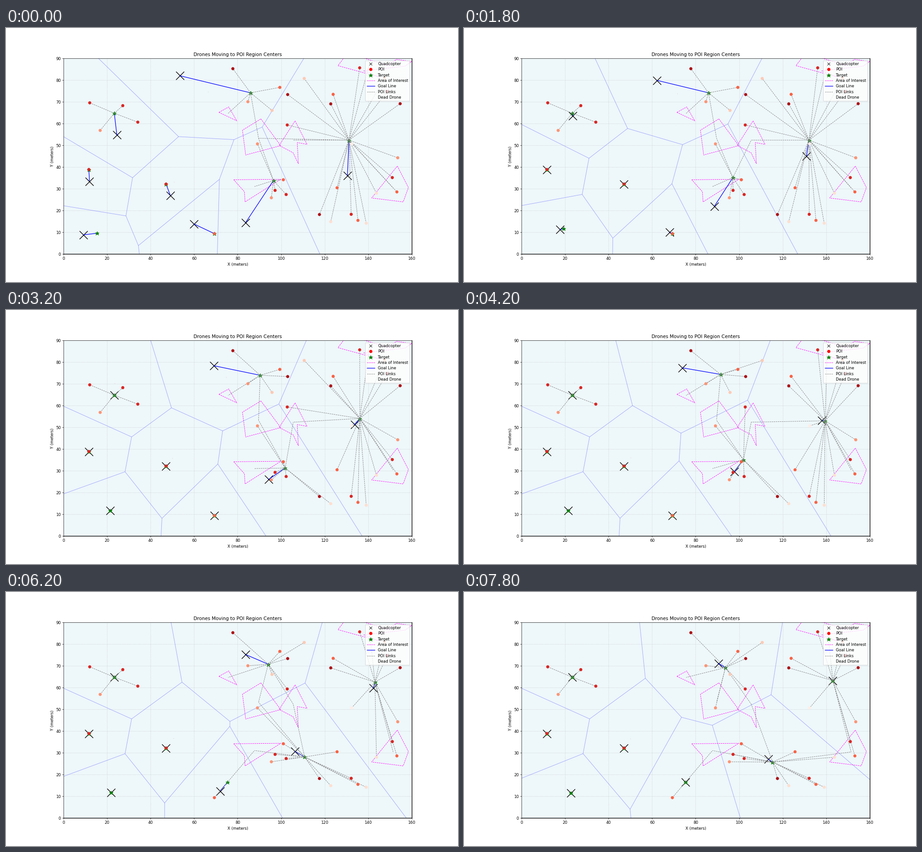
Recreate the animation shown at these times as a matplotlib script. Size 998 by 561 pixels, loop 8000 ms.

```python
import numpy as np
import matplotlib.pyplot as plt
from matplotlib.animation import FuncAnimation
from matplotlib.collections import LineCollection
from matplotlib.lines import Line2D
from matplotlib.patches import Polygon

DPI = 62.375
W, H = 160, 90
FRAMES, INTERVAL = 40, 200
SPEED = 1.0
AREA_WEIGHT = 0.25

# Points of interest by weight; the weight sets both colour and pull.
POIS = {
    .85: [(77.8, 85.3), (103.0, 73.4), (122.8, 69.1), (154.7, 69.2), (117.6, 18.2),
          (148.8, 74.8)],
    .70: [(12.0, 69.6), (27.2, 68.3), (34.1, 60.7), (102.8, 59.4), (136.1, 85.7),
          (151.1, 35.2), (132.2, 18.3), (97.2, 29.3), (102.3, 27.4), (11.6, 38.9),
          (47.1, 32.2)],
    .52: [(99.4, 76.7), (123.9, 73.5), (153.2, 28.6), (125.7, 30.5), (135.3, 15.5),
          (101.0, 34.2), (69.3, 9.4)],
    .37: [(16.8, 56.9), (84.7, 70.1), (89.1, 50.7), (153.6, 44.3), (95.5, 25.9),
          (147.5, 81.0)],
    .20: [(95.8, 66.1), (110.6, 80.8)],
    .13: [(122.8, 14.9), (139.1, 14.2), (143.8, 28.0)],
    .04: [(132.4, 50.7)],
}

AREAS = [
    [(90.7, 62.2), (99.8, 49.9), (83.7, 45.6), (82.2, 57.0)],
    [(106.4, 61.3), (111.9, 50.5), (107.4, 51.3), (107.9, 41.6), (105.5, 46.6),
     (99.1, 50.0)],
    [(78.2, 34.2), (99.8, 34.4), (83.4, 24.0), (83.1, 28.7)],
    [(71.4, 65.2), (75.9, 67.7), (79.6, 61.3)],
    [(153.4, 40.5), (158.5, 30.6), (156.1, 24.0), (141.6, 25.8)],
    [(126.1, 86.7), (145, 81.5), (138, 84.3), (157, 86.5), (160, 88.6), (153, 89.6),
     (149, 86.8), (138, 90.2), (128.8, 90.2)],
]

START = np.array([(52.47, 82.29), (24.59, 53.76), (11.93, 32.5), (8.07, 8.7),
                  (49.41, 26.0), (59.0, 14.28), (83.09, 13.62), (130.42, 35.1)])

POINTS = np.array([p for group in POIS.values() for p in group])
WEIGHTS = np.array([w for w, group in POIS.items() for _ in group])
GRID = np.stack(np.meshgrid(np.arange(.25, W, .5), np.arange(.25, H, .5)), -1).reshape(-1, 2)


def outline(corners):
    c = np.array(corners)
    t = np.linspace(0, 1, 60)[:, None]
    return np.vstack([a + t * (b - a) for a, b in zip(c, np.roll(c, -1, 0))])


def centroid(corners):
    a = np.array(corners)
    b = np.roll(a, -1, 0)
    cross = a[:, 0] * b[:, 1] - b[:, 0] * a[:, 1]
    return cross @ (a + b) / (3 * cross.sum())


OUTLINES = [outline(a) for a in AREAS]
CENTERS = [centroid(a) for a in AREAS]


def nearest(points, sites):
    return ((points[:, None] - sites) ** 2).sum(2).argmin(1)


def cell_centroids(sites):
    owner = nearest(GRID, sites)
    return np.array([GRID[owner == i].mean(0) for i in range(len(sites))])


def voronoi_edges(sites):
    """Clip each pair's bisector to the part that no third site is closer to."""
    edges = []
    for i, p in enumerate(sites):
        for j in range(i + 1, len(sites)):
            q = sites[j]
            mid = (p + q) / 2
            d = np.array([p[1] - q[1], q[0] - p[0]]) / np.hypot(*(q - p))
            lo, hi = -300, 300
            for k, r in enumerate(sites):
                if k in (i, j):
                    continue
                a = 2 * d @ (r - p)
                b = r @ r - p @ p - 2 * mid @ (r - p)
                if a > 0:
                    hi = min(hi, b / a)
                elif a < 0:
                    lo = max(lo, b / a)
            if lo < hi:
                edges.append([mid + lo * d, mid + hi * d])
    return edges


def owned_items(sites):
    """Yield (drone, place, weight); an area belongs to every cell it touches."""
    yield from zip(nearest(POINTS, sites), POINTS, WEIGHTS)
    for center, edge in zip(CENTERS, OUTLINES):
        for drone in np.unique(nearest(edge, sites)):
            yield drone, center, AREA_WEIGHT


def plan(sites):
    """Each goal is the weighted mean of a cell's items, or the cell's centroid."""
    middles = cell_centroids(sites)
    goals = middles.copy()
    items = list(owned_items(sites))
    for i in range(len(sites)):
        mine = [(p, w) for drone, p, w in items if drone == i]
        if mine:
            places, weights = zip(*mine)
            goals[i] = np.average(places, axis=0, weights=weights)
    return middles, goals, [[goals[drone], p] for drone, p, _ in items]


def simulate():
    states, pos = [], START
    for _ in range(FRAMES):
        middles, goals, joins = plan(pos)
        gap = goals - pos
        dist = np.maximum(np.hypot(*gap.T), 1e-9)
        moved = pos + gap * np.minimum(1, SPEED / dist)[:, None]
        states.append((moved, goals, middles, voronoi_edges(pos), joins))
        pos = moved
    return states


STATES = simulate()

fig = plt.figure(figsize=(998 / DPI, 561 / DPI), dpi=DPI)
ax = fig.add_axes((0.1275, 0.11, 0.77, 0.77))
ax.set(xlim=(0, W), ylim=(0, H), facecolor="#eef7fa", axisbelow=True,
       xlabel="X (meters)", ylabel="Y (meters)",
       title="Drones Moving to POI Region Centers")
ax.grid(True, ls=":", lw=0.8, color="gray", alpha=0.5)
for side in ("right", "bottom"):
    ax.spines[side].set_linewidth(1.6)

for corners in AREAS:
    ax.add_patch(Polygon(corners, fill=False, ec="magenta", ls="--", lw=1, zorder=1.5))
ax.scatter(*POINTS.T, s=50, c=plt.cm.Reds(WEIGHTS), lw=0.8, zorder=2.8)


def segments(**style):
    return ax.add_collection(LineCollection([], **style), autolim=False)


def markers(marker, **style):
    return ax.plot([], [], marker, ls="none", **style)[0]


cells = segments(colors="blue", lw=1, alpha=0.35, zorder=1.2)
goal_lines = segments(colors="blue", lw=1.5, zorder=2.2)
links = segments(colors="gray", lw=1, linestyles="--", zorder=2.6)
dots = markers(".", color="#c87878", ms=1.2, mew=0, zorder=1.6)
drones = markers("x", color="black", ms=21, mew=1.6, zorder=2)
stars = markers("*", color="green", ms=10, zorder=2.4)


def key(label, color="none", marker=None, ls="none", **style):
    return Line2D([], [], color=color, marker=marker, ls=ls, label=label, **style)


ax.legend(handles=[
    key("Quadcopter", "black", "x"),
    key("POI", "red", "o", ms=7),
    key("Target", "green", "*", ms=10),
    key("Area of Interest", "magenta", ls="--", lw=1),
    key("Goal Line", "blue", ls="-", lw=1.5),
    key("POI Links", "gray", ls="--", lw=1),
    key("Dead Drone"),
], loc="upper right", labelspacing=0.38)


def update(n):
    pos, goals, middles, edges, joins = STATES[n]
    cells.set_segments(edges)
    goal_lines.set_segments(np.stack([pos, goals], 1))
    links.set_segments(joins)
    dots.set_data(*middles.T)
    drones.set_data(*pos.T)
    stars.set_data(*goals.T)
    return cells, goal_lines, links, dots, drones, stars


anim = FuncAnimation(fig, update, frames=FRAMES, interval=INTERVAL,
                     init_func=lambda: update(0), repeat=True, repeat_delay=0)
plt.show()
```
